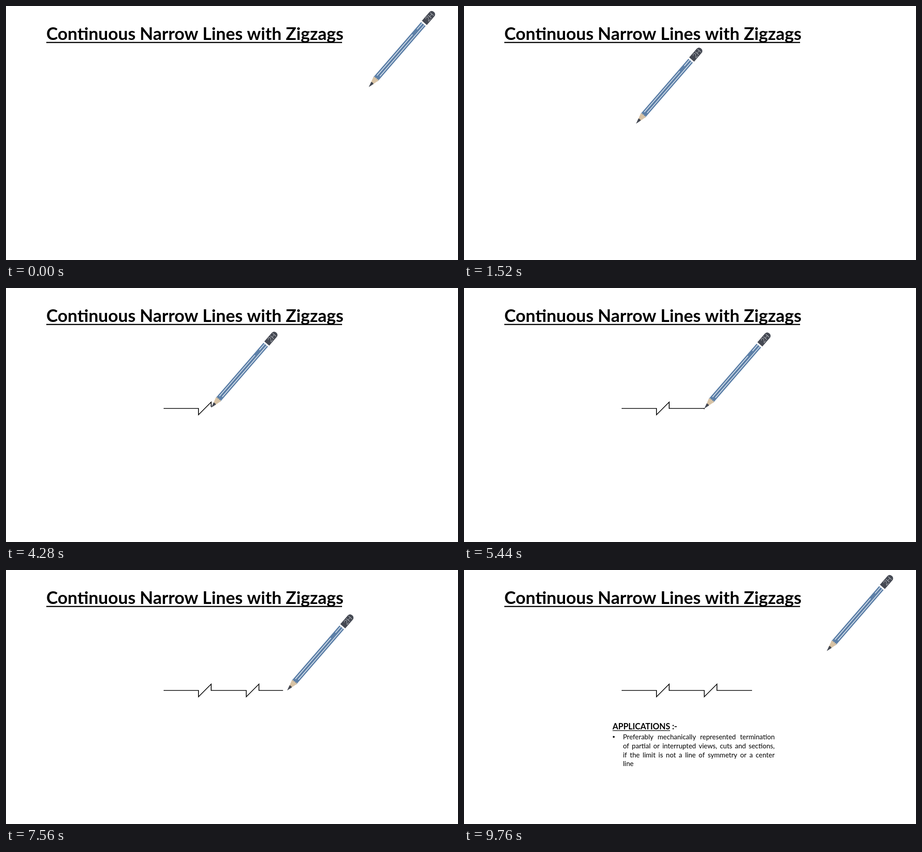
Animation, 998 px wide and 561 px high, one loop 9800 ms. Source, as an HTML page with a canvas:

```html
<!DOCTYPE html>
<html lang="en">
<head>
<meta charset="utf-8">
<title>Continuous Narrow Lines with Zigzags</title>
<style>
  html, body { margin: 0; width: 100%; height: 100%; overflow: hidden; background: #fff; }
  canvas { display: block; }
</style>
</head>
<body>
<canvas id="stage" width="998" height="561"></canvas>
<script>
const ctx = document.getElementById('stage').getContext('2d');
const LOOP = 9800, STEP = 40, TEXT_TIME = 9740;
const FONT = 'Lato, "Open Sans", sans-serif';
const HOME = [801, 179];
const PENCIL_ANGLE = -Math.atan2(0.756, 0.655);

// Each leg of the pencil's journey: start time, end time, destination, and whether it draws.
const LINE_START = [348, 266];
const legs = [
  { from: 90, to: 1850, end: LINE_START },
  { from: 1920, to: 2930, end: [425, 266], draws: true },
  { from: 2930, to: 3430, end: [425, 280], draws: true },
  { from: 3430, to: 3920, end: [453, 252], draws: true },
  { from: 3920, to: 4395, end: [453, 266], draws: true },
  { from: 4395, to: 5390, end: [530.5, 266], draws: true },
  { from: 5390, to: 5890, end: [530.5, 280], draws: true },
  { from: 5890, to: 6365, end: [558.5, 252], draws: true },
  { from: 6365, to: 6870, end: [558.5, 266], draws: true },
  { from: 6870, to: 7875, end: [636, 266], draws: true },
  { from: 7905, to: 9735, end: HOME },
];

const clamp = v => Math.min(1, Math.max(0, v));
const ease = p => p < 0.5 ? 2 * p * p : 1 - 2 * (1 - p) ** 2;
const mix = (a, b, p) => [a[0] + (b[0] - a[0]) * p, a[1] + (b[1] - a[1]) * p];
const progress = (leg, t) => clamp((t - leg.from) / (leg.to - leg.from));

function pencilTip(t) {
  let tip = HOME;
  for (const leg of legs) {
    if (t <= leg.from) break;
    tip = mix(tip, leg.end, ease(progress(leg, t)));
  }
  return tip;
}

function drawLine(t) {
  let last = LINE_START;
  ctx.beginPath();
  ctx.moveTo(...last);
  for (const leg of legs) {
    if (!leg.draws || t <= leg.from) continue;
    ctx.lineTo(...mix(last, leg.end, progress(leg, t)));
    last = leg.end;
  }
  ctx.strokeStyle = '#000';
  ctx.lineWidth = 1.7;
  ctx.lineJoin = 'miter';
  ctx.stroke();
}

function fillPath(color, build) {
  ctx.fillStyle = color;
  ctx.beginPath();
  build();
  ctx.fill();
}

function stripe(from, to, offset) {
  ctx.beginPath();
  ctx.moveTo(from, offset);
  ctx.lineTo(to, offset);
  ctx.stroke();
}

// Drawn along the x axis, with the tip at the origin.
function drawPencil([x, y]) {
  ctx.save();
  ctx.translate(x, y);
  ctx.rotate(PENCIL_ANGLE);

  fillPath('#5d80a8', () => ctx.rect(23, -6.6, 161, 13.2));
  fillPath('#d8c3a5', () => {
    ctx.moveTo(10, -2.8);
    ctx.lineTo(23, -6.6);
    for (const n of [-2.2, 2.2, 6.6]) ctx.quadraticCurveTo(29, n - 2.2, 24, n);
    ctx.lineTo(10, 2.8);
  });
  fillPath('#454953', () => {
    ctx.moveTo(0, 0);
    ctx.lineTo(12, -3.4);
    ctx.quadraticCurveTo(14, 0, 12, 3.4);
  });

  ctx.strokeStyle = '#f2f6fa';
  ctx.lineWidth = 1.4;
  stripe(31, 151, -2.9);
  stripe(166, 184, -2.9);
  stripe(34, 184, 2.9);

  fillPath('#454953', () => ctx.roundRect(187.5, -7.2, 32, 14.4, [0, 6.5, 6.5, 0]));
  ctx.fillStyle = '#e3e5e8';
  ctx.font = '300 15px ' + FONT;
  ctx.textAlign = 'center';
  ctx.fillText('2H', 205, 5.2);
  ctx.restore();
}

function label(text, x, y, font) {
  ctx.fillStyle = '#000';
  ctx.font = font + ' ' + FONT;
  ctx.fillText(text, x, y);
}

function justify(text, x, y, width) {
  const words = text.split(' ');
  const widths = words.map(w => ctx.measureText(w).width);
  const gap = (width - widths.reduce((a, b) => a + b)) / (words.length - 1);
  words.forEach((word, i) => {
    ctx.fillText(word, x, y);
    x += widths[i] + gap;
  });
}

function drawTitle() {
  label('Continuous Narrow Lines with Zigzags', 89, 75, 'bold 38.4px');
  ctx.fillRect(89, 79.3, 653, 2.5);
}

function drawApplications() {
  const heading = 'APPLICATIONS';
  label(heading + ' :-', 328, 352, 'bold 18px');
  ctx.fillRect(328, 354, ctx.measureText(heading).width, 1.3);
  fillPath('#000', () => ctx.arc(330.6, 368.6, 2.1, 0, Math.PI * 2));
  ctx.font = '15px ' + FONT;
  justify('Preferably mechanically represented termination', 351, 373.8, 335);
  justify('of partial or interrupted views, cuts and sections,', 351, 393.6, 335);
  justify('if the limit is not a line of symmetry or a center', 351, 413.5, 335);
  ctx.fillText('line', 351, 433.4);
}

function draw() {
  const t = Math.floor((performance.now() % LOOP) / STEP) * STEP;
  ctx.fillStyle = '#fff';
  ctx.fillRect(0, 0, 998, 561);
  drawTitle();
  drawLine(t);
  if (t >= TEXT_TIME) drawApplications();
  drawPencil(pencilTip(t));
  requestAnimationFrame(draw);
}
draw();
</script>
</body>
</html>
```
